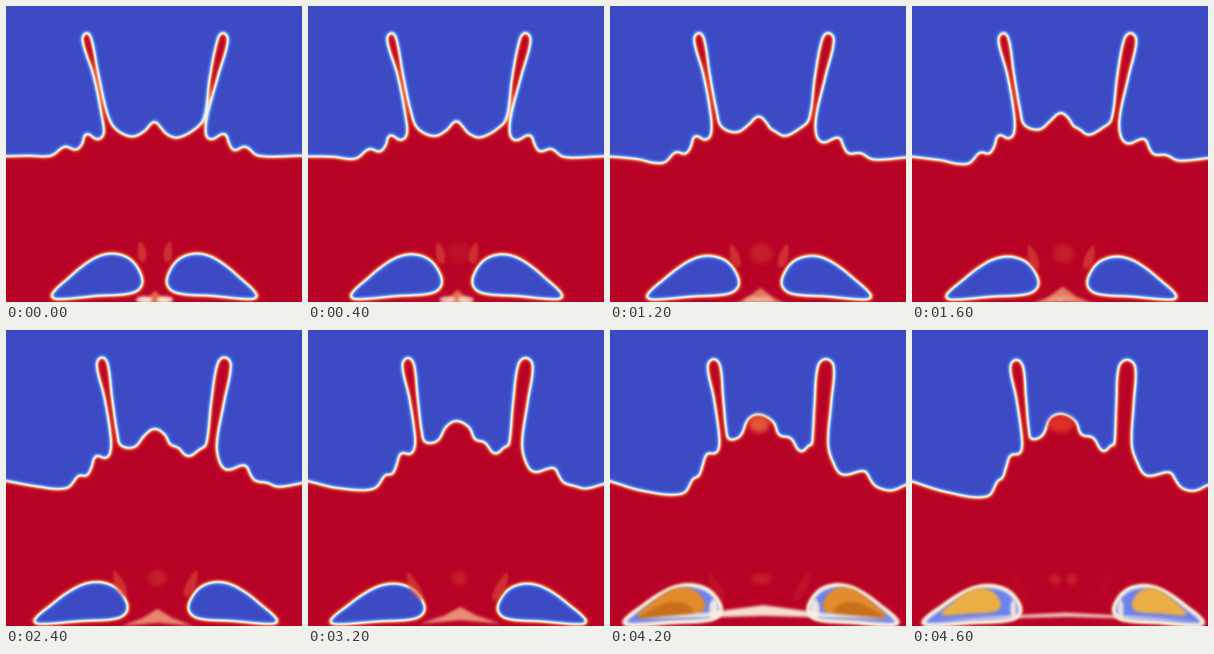
Animation of 512x512 px, one loop 4800 ms. Source, as an HTML page with a canvas:

```html
<!DOCTYPE html>
<html lang="en">
<head>
<meta charset="utf-8">
<title>Heat field</title>
<style>
html, body { margin: 0; width: 100%; height: 100%; overflow: hidden; background: #3c4ac4; }
canvas { display: block; width: 100vw; height: 100vh; }
</style>
</head>
<body>
<canvas id="view" width="512" height="512"></canvas>
<script>
const SIZE = 512, PAD = 16, FULL = SIZE + 2 * PAD;
const LOOP = 4800, STEP = 200, LAST = LOOP - STEP;

const clamp = v => Math.max(0, Math.min(1, v));
const mix = (a, b, u) => a + (b - a) * u;
const mixAll = (a, b, u) => a.map((v, i) => mix(v, b[i], u));
const smooth = u => u * u * (3 - 2 * u);
const easeOut = u => 1 - (1 - u) ** 1.4;
const rgba = (c, a) => `rgba(${c.map(Math.round).join()},${a})`;

const CREAM = [252, 240, 222], SALMON = [232, 116, 84], EMBER = [222, 78, 58], LILAC = [108, 130, 238];

// Ridge points as start x, y and end x, y
const LEFT = [[-30,261,-30,254], [0,260,0,262], [40,259,58,280], [78,259,130,288], [102,243,149,260],
  [121,249,156,257], [132,238,163,237], [139,221,171,216], [158,231,184,215], [169,222,190,207]];
const MIDDLE = [[190,213,207,189], [218,226,226,182], [240,216,239,153], [256,200,258,145], [266,208,283,158],
  [274,218,293,181], [280,223,313,186], [296,228,331,210], [324,215,346,198]];
const RIGHT = [[346,224,390,230], [356,231,406,252], [378,221,446,246], [386,238,455,258], [395,250,463,270]];
const FAR_RIGHT = [[414,243,472,276], [436,259,490,278], [512,259,512,268], [540,260,540,258]];

// Outline of one lower lobe in a unit box, tip at the left
const LOBE = [[0,.92], [.2,.52], [.36,.25], [.52,.06], [.68,0], [.84,.09], [.95,.32], [1,.66], [.9,.86], [.5,.93], [.06,1]];

const travel = (list, u) => list.map(([x, y, X, Y]) => [mix(x, X, u), mix(y, Y, u)]);

// Rounded spike from a base up to its tip; radii at tip, middle and base
function horn([tx, ty], [bx, by], [rt, rm, rb]) {
  const mx = (tx + bx) / 2, my = (ty + by) / 2;
  return [[bx - rb, by], [mx - rm, my], [tx - rt, ty + 12], [tx, ty],
    [tx + rt, ty + 12], [mx + rm, my], [bx + rb, by - 4]];
}

function ridge(u) {
  const out = easeOut(u), sway = 5 * Math.sin(2 * Math.PI * u), lean = 4 * Math.sin(Math.PI * u);
  return [
    ...travel(LEFT, u).map(([x, y], i) => [x, i > 2 ? y + sway : y]),
    ...horn([mix(140, 181, out), mix(46, 51, u ** 3)], [mix(171, 196, out), mix(192, 180, u)],
      mixAll([8, 4.5, 5], [11, 8.5, 6.5], u)),
    ...travel(MIDDLE, smooth(u)),
    ...horn([375 + lean - 3 * u, mix(46, 51, u ** 3)], [mix(345, 365, u), mix(195, 202, u)],
      mixAll([9, 7, 3], [14, 15, 15], u)),
    ...travel(RIGHT, u),
    ...travel(FAR_RIGHT, out)
  ];
}

// Both lobes as boxes: tip x, inner x, top, bottom
const lobes = u => [[mix(78, 20, u), mix(236, 187, u)], [mix(435, 503, u), mix(278, 350, u)]]
  .map(([tip, inner]) => [tip, inner, mix(428, 443, u), mix(507, 510, u)]);

const place = ([x0, x1, y0, y1], [x, y]) => [mix(x0, x1, x), mix(y0, y1, y)];
function inset(box, left, top, right, bottom) {
  const [x0, y0] = place(box, [left, top]), [x1, y1] = place(box, [right, bottom]);
  return [x0, x1, y0, y1];
}

// Colour ramp: level, r, g, b
const STOPS = [[0,60,74,196], [.1,72,106,220], [.25,122,172,248], [.38,208,228,246], [.48,246,242,228],
  [.6,250,214,184], [.75,238,126,92], [.9,204,40,46], [1,185,3,38]];
const ramp = Array.from({ length: 256 }, (_, n) => {
  const v = n / 255, i = Math.max(1, STOPS.findIndex(s => s[0] >= v));
  const a = STOPS[i - 1], b = STOPS[i];
  return mixAll(a, b, (v - a[0]) / (b[0] - a[0])).slice(1);
});

const view = document.getElementById("view").getContext("2d");
function layer() {
  const c = document.createElement("canvas");
  c.width = c.height = FULL;
  return c.getContext("2d", { willReadFrequently: true });
}
const field = layer(), soft = layer();
const pixels = view.createImageData(SIZE, SIZE);

// Smooth curve with handles scaled to each segment
function trace(g, pts, closed) {
  const n = pts.length;
  const at = i => pts[closed ? (i + n) % n : Math.max(0, Math.min(n - 1, i))];
  const dir = i => {
    const a = at(i - 1), b = at(i + 1), x = b[0] - a[0], y = b[1] - a[1], d = Math.hypot(x, y) || 1;
    return [x / d, y / d];
  };
  g.beginPath();
  g.moveTo(...pts[0]);
  for (let i = 0; i < (closed ? n : n - 1); i++) {
    const p = at(i), q = at(i + 1), u = dir(i), v = dir(i + 1);
    const h = Math.hypot(q[0] - p[0], q[1] - p[1]) / 3;
    g.bezierCurveTo(p[0] + u[0] * h, p[1] + u[1] * h, q[0] - v[0] * h, q[1] - v[1] * h, q[0], q[1]);
  }
}

function lobe(g, box, colour) {
  trace(g, LOBE.map(p => place(box, p)), true);
  g.fillStyle = colour;
  g.fill();
}

// Two-level shape, blurred, then mapped through the ramp
function drawField(u) {
  field.setTransform(1, 0, 0, 1, PAD, PAD);
  field.fillStyle = "#000";
  field.fillRect(-PAD, -PAD, FULL, FULL);
  trace(field, ridge(u), false);
  field.lineTo(540, 540);
  field.lineTo(-30, 540);
  field.fillStyle = "#fff";
  field.fill();
  for (const box of lobes(u)) lobe(field, box, "#000");
  soft.filter = "blur(3.6px)";
  soft.drawImage(field.canvas, 0, 0);
  const src = soft.getImageData(PAD, PAD, SIZE, SIZE).data;
  for (let i = 0; i < src.length; i += 4) pixels.data.set([...ramp[src[i]], 255], i);
  view.putImageData(pixels, 0, 0);
}

function blob(x, y, rx, ry, colour, alpha) {
  view.fillStyle = rgba(colour, clamp(alpha));
  view.beginPath();
  view.ellipse(x, y, rx, ry, 0, 0, 2 * Math.PI);
  view.fill();
}

function tear([x, y], [fx, fy], alpha) {
  const s = Math.sign(fx - x);
  view.fillStyle = rgba(EMBER, alpha);
  view.beginPath();
  view.moveTo(x, y);
  view.bezierCurveTo(x + s * 10, y + 8, fx + s * 9, fy - 14, fx + s * 2, fy);
  view.bezierCurveTo(fx - s * 12, fy, x - s * 5, y + 22, x, y);
  view.fill();
}

function drawBand(cx, half, top, foot, colour) {
  const side = mix(top, foot, .65), end = foot + 6;
  view.fillStyle = rgba(colour, .92);
  view.beginPath();
  view.moveTo(cx - half, end);
  view.lineTo(cx - half * .4, side);
  view.lineTo(cx, top);
  view.lineTo(cx + half * .4, side);
  view.lineTo(cx + half, end);
  view.lineTo(cx, foot);
  view.fill();
}

function drawGlow(box, heat, cool) {
  view.globalAlpha = heat;
  lobe(view, box, rgba(LILAC, 1));
  view.strokeStyle = rgba(CREAM, .95);
  view.lineWidth = 7;
  view.stroke();
  const [x, y] = place(box, [.93, .6]);
  blob(x, y, mix(11, 5, cool), 17, CREAM, .9);
  lobe(view, inset(box, mix(.08, .18, cool), .05, mix(.88, .8, cool), mix(.88, .76, cool)),
    rgba(mixAll([220, 104, 18], [234, 174, 68], cool), 1));
  lobe(view, inset(box, .14, .42, .72, .86), rgba([166, 74, 0], .85 * (1 - cool)));
  view.globalAlpha = 1;
}

function draw(t) {
  const u = t / LAST;
  const rise = clamp(t / 3200), heat = clamp((t - 3200) / 600), cool = clamp((t - 3800) / 800);
  drawField(u);

  view.filter = "blur(2px)";
  const fade = .6 - .3 * heat - .24 * cool;
  tear([mix(231, 172, rise), mix(406, 418, rise)], [mix(238, 195, rise), mix(443, 468, rise)], fade);
  tear([mix(284, 345, rise), mix(406, 418, rise)], [mix(278, 322, rise), mix(443, 468, rise)], fade);

  view.filter = "blur(4px)";
  blob(258, 163, mix(13, 22, cool), 14, mixAll([236, 150, 84], [230, 56, 42], cool), heat * .85);
  for (const s of [-1, 1]) {
    blob(262 + s * 14 * cool, 427 + 4 * u, mix(24, 8, u), mix(20, 8, u), EMBER, Math.min(.2, u) + .3 * cool);
  }

  view.filter = "blur(2.5px)";
  if (heat > 0) for (const box of lobes(u)) drawGlow(box, heat, cool);
  drawBand(258 + 8 * u, 44 + 26 * rise + 155 * heat, 492 - 13 * rise - 16 * heat + 26 * cool,
    520 - 18 * rise - 9 * heat + 3 * cool, mixAll(SALMON, CREAM, clamp(.3 * rise + .8 * heat - .2 * cool)));
  for (const s of [-1, 1]) blob(257 + s * mix(18, 0, rise), 508, 14, 6, CREAM, .9 * (1 - 1.5 * rise));
  view.filter = "none";
}

let shown = -1;
function tick() {
  const t = Math.floor(performance.now() % LOOP / STEP) * STEP;
  if (t !== shown) draw(shown = t);
  requestAnimationFrame(tick);
}
tick();
</script>
</body>
</html>
```
